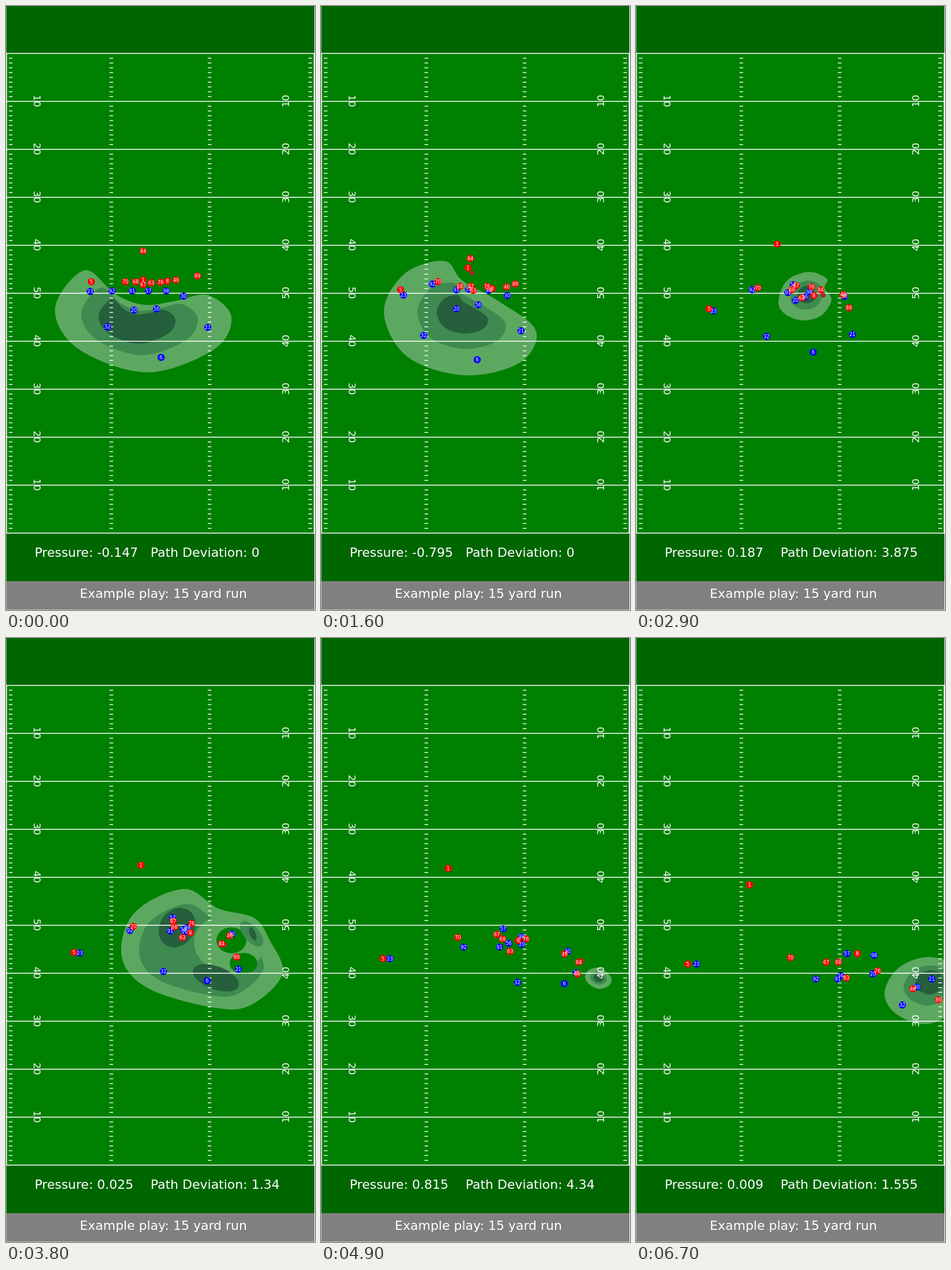
Recreate the animation shown at these times as an HTML page with a canvas. Size 536x1045 px, loop 6.8 s.

```html
<!DOCTYPE html>
<html lang="en">
<head>
<meta charset="utf-8">
<title>Example play</title>
<style>
  html, body { margin: 0; width: 100%; height: 100%; overflow: hidden; background: #fff; }
  canvas { display: block; }
</style>
</head>
<body>
<canvas id="stage" width="536" height="1045"></canvas>
<script>
const ctx = document.getElementById('stage').getContext('2d');
const LOOP = 6800, STEP = 100;
const TOP = 82, YARD = 8.3, END = TOP + 110 * YARD, RIGHT = 535;
const RED = '#ff0000', BLUE = '#0000ff', BROWN = '#a52a2a', GREEN = '#008000';
const LIGHT = '#5ca860', MEDIUM = '#3e8a50', DARK = '#265f3c';

// ---- timing ----
const PHASES = [0, 1600, 2900, 3800, 4900, 5800, 6700];
const RUN = [0, 1600, 3800, 6700];
const mix = (a, b, u) => a + (b - a) * u;

function segment(times, t) {
  let i = 0;
  while (i < times.length - 2 && t >= times[i + 1]) i++;
  return [i, (t - times[i]) / (times[i + 1] - times[i])];
}
function linear(values, t) {
  const [i, u] = segment(PHASES, t);
  return mix(values[i], values[i + 1], u);
}

// Smooth run through the key positions, starting at rest
function glide(values, t) {
  const [i, u] = segment(RUN, t), v = 1 - u, h = RUN[i + 1] - RUN[i];
  const slope = k => {
    if (k === 0) return 0;
    const next = Math.min(k + 1, RUN.length - 1);
    return (values[next] - values[k - 1]) / (RUN[next] - RUN[k - 1]);
  };
  return values[i] * (1 + 2 * u) * v * v + slope(i) * h * u * v * v
       + values[i + 1] * u * u * (3 - 2 * u) - slope(i + 1) * h * u * u * v;
}

// ---- players: position at each RUN time ----
const pairs = xy => Array.from({ length: xy.length / 2 }, (_, i) => [xy[2 * i], xy[2 * i + 1]]);
const players = [];
function player(color, label, ...xy) {
  const path = pairs(xy);
  players.push({ color, label, xs: path.map(p => p[0]), ys: path.map(p => p[1]) });
}
player(BLUE, 23, 146,494, 143,500, 128,545, 105,564);
player(BLUE, 92, 184,493, 193,481, 215,506, 312,590);
player(BLUE, 91, 219,493, 235,491, 285,507, 350,590);
player(BLUE, 57, 247,493, 256,490, 289,484, 366,546);
player(BLUE, 98, 278,493, 291,492, 315,501, 413,549);
player(BLUE, 30, 308,502, 323,501, 392,512, 487,604);
player(BLUE, 20, 222,526, 235,524, 310,508, 411,581);
player(BLUE, 56, 261,524, 273,517, 308,504, 355,584);
player(BLUE, 32, 176,555, 178,570, 273,577, 462,635);
player(BLUE, 21, 350,556, 347,562, 403,573, 513,590);
player(BLUE, 6, 269,608, 271,612, 349,593, 560,614);
player(BROWN, '', 238,482, 262,462, 379,531, 580,600);
player(RED, 84, 238,424, 259,437, 374,529, 575,605);
player(RED, 70, 207,477, 203,477, 221,499, 268,553);
player(RED, 68, 225,477, 241,485, 292,500, 351,561);
player(RED, 67, 238,482, 260,485, 290,490, 330,561);
player(RED, 1, 238,474, 255,453, 234,393, 197,427);
player(RED, 63, 252,479, 264,492, 306,518, 365,588);
player(RED, 76, 268,478, 288,485, 322,494, 419,576);
player(RED, 8, 280,476, 297,489, 320,510, 384,546);
player(RED, 46, 295,474, 322,486, 388,515, 480,607);
player(RED, 89, 332,467, 337,481, 400,552, 525,626);
player(RED, 5, 148,477, 138,491, 118,544, 90,564);

// ---- heat: an outline per phase; inner levels shrink toward a focus ----
const SAMPLES = 72;
function spline(points) {
  const n = points.length, at = k => points[(k + n) % n];
  return Array.from({ length: SAMPLES }, (_, s) => {
    const p = s * n / SAMPLES, k = Math.floor(p), u = p - k;
    return [0, 1].map(d => {
      const a = at(k - 1)[d], b = at(k)[d], c = at(k + 1)[d], e = at(k + 2)[d];
      return b + 0.5 * u * (c - a + u * (2 * a - 5 * b + 4 * c - e + u * (3 * (b - c) + e - a)));
    });
  });
}
const shrink = (points, x, y, k) => points.map(p => [mix(x, p[0], k), mix(y, p[1], k)]);

const heat = [];
function phase({ x, y, mid, core = mid * mid }, ...xy) {
  const edge = spline(pairs(xy));
  heat.push([1, mid, core].map(k => shrink(edge, x, y, k)));
}
phase({ x: 219, y: 546, mid: 0.66 }, 85,523, 136,457, 190,499, 240,517, 295,510, 350,500,
  391,538, 361,594, 245,634, 125,593);
phase({ x: 247, y: 530, mid: 0.58 }, 109,530, 145,463, 214,441, 245,475, 310,512, 373,562,
  345,617, 250,639, 150,607);
phase({ x: 298, y: 497, mid: 0.6 }, 247,512, 262,475, 300,460, 331,472, 327,488, 339,508,
  322,535, 290,544, 260,534);
phase({ x: 335, y: 547, mid: 0.77, core: 0 }, 201,553, 222,476, 308,434, 368,468, 430,484,
  457,522, 480,580, 430,632, 370,641, 250,608);
phase({ x: 482, y: 588, mid: 0.62 }, 458,585, 466,574, 484,571, 503,587, 500,601, 482,607, 464,598);
phase({ x: 523, y: 592, mid: 0.6 }, 497,597, 519,575, 545,580, 560,605, 545,628, 515,616);
phase({ x: 514, y: 588, mid: 0.6 }, 431,616, 455,571, 508,552, 558,572, 565,630, 510,667, 455,653);

function fill(color) {
  ctx.fillStyle = color;
  ctx.fill();
}
function oval(color, x, y, rx, ry, tilt, size) {
  ctx.beginPath();
  ctx.ellipse(x, y, rx * size, ry * size, tilt, 0, 2 * Math.PI);
  fill(color);
}

// Pockets around the edge runners, open for about a second
function drawPockets(size) {
  oval(LIGHT, 386, 530, 60, 50, 0.2, size);
  oval(GREEN, 391, 523, 26, 22.5, 0, size);
  oval(GREEN, 412, 563, 24, 18, 0, size);
  oval(MEDIUM, 426, 512, 27, 13, 0.85, size);
  oval(DARK, 428, 512, 12, 5, 1.2, size);
  oval(DARK, 297, 501, 30, 36, 0.6, size);
  oval(DARK, 364, 588, 42, 20, 0.35, size);
}
function drawHeat(t) {
  const [i, u] = segment(PHASES, t);
  [LIGHT, MEDIUM, DARK].forEach((color, level) => {
    const to = heat[i + 1][level];
    ctx.beginPath();
    heat[i][level].forEach(([x, y], k) => ctx.lineTo(mix(x, to[k][0], u), mix(y, to[k][1], u)));
    fill(color);
  });
  const size = 1 - Math.abs(t - 3800) / 500;
  if (size > 0) drawPockets(size);
}

// ---- field ----
function band(color, from, to) {
  ctx.fillStyle = color;
  ctx.fillRect(0.5, from, RIGHT - 0.5, to - from);
}
function line(x1, y1, x2, y2) {
  ctx.beginPath();
  ctx.moveTo(x1, y1);
  ctx.lineTo(x2, y2);
  ctx.stroke();
}
function text(str, x, y, size, align = 'left') {
  ctx.font = size + 'px "DejaVu Sans", sans-serif';
  ctx.textAlign = align;
  ctx.fillStyle = '#fff';
  ctx.fillText(str, x, y);
}
function sideText(str, x, y, turn) {
  ctx.save();
  ctx.translate(x, y);
  ctx.rotate(turn * Math.PI / 2);
  text(str, 0, 6.1, 16.67, 'center');
  ctx.restore();
}
function drawMarks() {
  ctx.strokeStyle = '#fff';
  ctx.lineWidth = 1.4;
  [1, RIGHT - 0.5].forEach(x => line(x, TOP, x, TOP + 100 * YARD));
  for (let yard = 0; yard <= 100; yard++) {
    const y = TOP + yard * YARD;
    if (yard % 10) {
      [5, 179.5, 350, 524.5].forEach(x => line(x, y, x + 6.3, y));
      continue;
    }
    line(0, y, RIGHT, y);
    if (yard % 100 === 0) continue;
    const label = 50 - Math.abs(50 - yard);
    sideText(label, 54, y - 0.7, 1);
    sideText(label, 484.5, y - 0.7, -1);
  }
}
function drawPlayers(t) {
  const placed = players.map(p => ({ ...p, x: glide(p.xs, t), y: glide(p.ys, t) }))
    .filter(p => p.x < RIGHT);
  placed.forEach(p => oval(p.color, p.x, p.y, 6.2, 6.2, 0, p.color === BROWN ? 0.7 : 1));
  placed.forEach(p => text(p.label, p.x, p.y + 3, 8.33, 'center'));
}

// ---- readouts ----
const PRESSURE = [-0.147, -0.795, 0.187, 0.025, 0.815, 1.297, 0.009];
const DEVIATION = [0, 0, 3.875, 1.34, 4.34, 2.92, 1.555];
const readout = (values, t) => Math.round(linear(values, t) * 1000) / 1000;

function draw(t) {
  ctx.fillStyle = '#fff';
  ctx.fillRect(0, 0, 536, 1045);
  band('#006600', 0, END);
  band(GREEN, TOP, TOP + 100 * YARD);
  band('#808080', END, 1044.5);
  ctx.save();
  ctx.beginPath();
  ctx.rect(0, 0, RIGHT, END);
  ctx.clip();
  drawHeat(t);
  ctx.restore();
  drawMarks();
  drawPlayers(t);
  text('Pressure: ' + readout(PRESSURE, t), 49.7, 953, 22);
  text('Path Deviation: ' + readout(DEVIATION, t), 250.7, 953, 22);
  text('Example play: 15 yard run', 273, 1024, 22, 'center');
}

function tick() {
  draw(Math.floor(performance.now() % LOOP / STEP) * STEP);
  requestAnimationFrame(tick);
}
tick();
</script>
</body>
</html>
```
